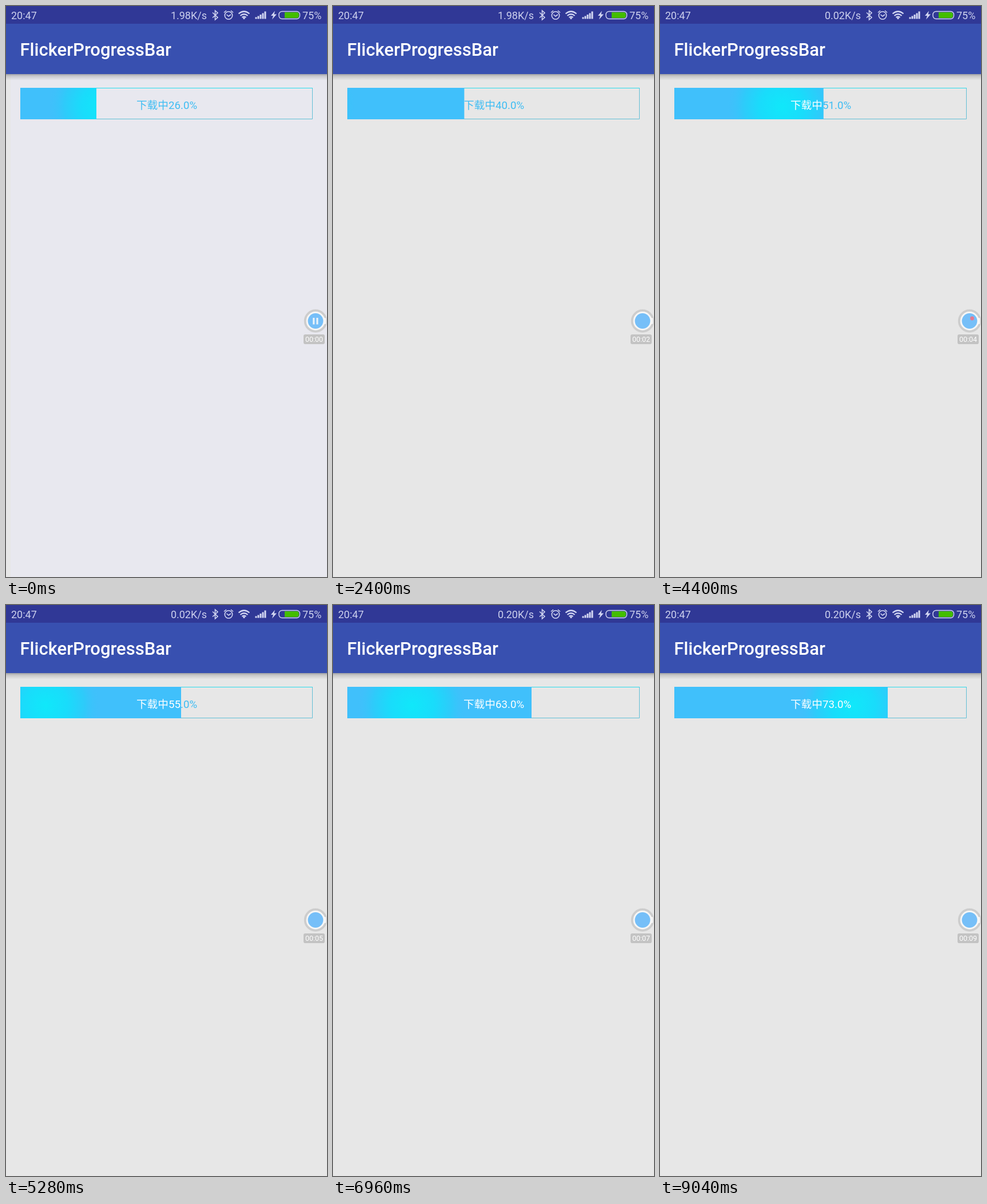
Recreate the animation shown at these times as an HTML page. Size 561 px wide and 998 px high, loop 9120 ms.

```html
<!DOCTYPE html>
<html lang="zh">
<head>
<meta charset="utf-8">
<title>FlickerProgressBar</title>
<style>
  html, body { margin: 0; width: 100%; height: 100%; overflow: hidden; background: #e7e7e7; }
  svg { display: block; width: 100%; height: 100%; }
  text { font-family: Roboto, "Noto Sans CJK SC", "Noto Sans CJK", sans-serif; }
  .status text { font-size: 18px; fill: #cdd1ee; }
  .icons { fill: none; stroke: #d3d7f2; stroke-width: 1.6; }
  .icons .solid { fill: #d3d7f2; stroke: none; }
  .label { font-size: 18.7px; text-anchor: middle; }
</style>
</head>
<body>
<svg viewBox="0 0 561 998">
  <defs>
    <linearGradient id="shadow" x2="0" y2="1">
      <stop stop-color="#000" stop-opacity=".34"/>
      <stop offset=".4" stop-color="#000" stop-opacity=".13"/>
      <stop offset="1" stop-color="#000" stop-opacity="0"/>
    </linearGradient>
    <radialGradient id="glow">
      <stop stop-color="#10e8fa"/>
      <stop offset=".4" stop-color="#19dcfb"/>
      <stop offset=".72" stop-color="#2fcafa"/>
      <stop offset="1" stop-color="#40c0fb" stop-opacity="0"/>
    </radialGradient>
    <clipPath id="done"><rect id="doneRect" x="25" y="143" height="55"/></clipPath>
  </defs>

  <rect width="561" height="998" fill="#e7e7e7"/>
  <rect id="tint" x="8" y="118" width="553" height="880" fill="#e8e8ef"/>
  <rect y="118" width="561" height="12" fill="url(#shadow)"/>
  <rect width="561" height="119" fill="#3850b0"/>
  <rect width="561" height="31" fill="#303896"/>
  <text x="24.5" y="87" font-size="31" font-weight="500" fill="#fff">FlickerProgressBar</text>

  <g class="status">
    <text x="9" y="22.5">20:47</text>
    <text id="speed" x="351" y="22.5" text-anchor="end"></text>
    <text x="518" y="22.5">75%</text>
  </g>
  <g class="icons">
    <path d="M361 11.5l9 8.5-4.500 4V8l4.500 4-9 8.500"/>
    <circle cx="389" cy="16.500" r="6.700"/>
    <path d="M385.500 15l3.500 3 4-3M381 11.500l4-3.500M397 11.500l-4-3.500"/>
    <path stroke-width="2.200" d="M406.500 13.500q9.500-8 19 0M409.500 17q6.500-5.500 13 0M412.500 20q3.500-2.600 7 0"/>
    <circle class="solid" cx="416" cy="21.500" r="1.700"/>
    <path stroke-width="3" d="M437 22.500v-3M441 22.500v-5M445 22.500v-7.500M449 22.500v-10M453 22.500v-13"/>
    <path class="solid" d="M470 8.500l-7 8.500h4l-2 6.500 8-9h-4.500z"/>
    <rect x="477" y="9.500" width="36.500" height="13" rx="5.500" stroke-width="1.400"/>
    <path fill="#43bd00" stroke="none" d="M487 11h22.500q2.500 1 2.500 5t-2.500 5H487z"/>
  </g>

  <path d="M25.500 143.500V197.500H535.500V143.500" fill="none" stroke="#62bfd6"/>
  <path d="M25 143.500H536" stroke="#2cdcec"/>
  <text class="label" x="281" y="180" fill="#3fbdf3"></text>
  <g clip-path="url(#done)">
    <rect x="25" y="143" width="511" height="55" fill="#40c0fb"/>
    <circle id="flicker" cy="176" r="96" fill="url(#glow)"/>
    <text class="label" x="281" y="180" fill="#fff"></text>
  </g>

  <circle cx="541" cy="550.500" r="18.300" fill="#f6f6f6" stroke="#cdcdcd" stroke-width="3.800"/>
  <rect x="555" y="545" width="4.500" height="11" rx="2" fill="#f6f6f6"/>
  <circle cx="541" cy="550.500" r="13.400" fill="#76bff8"/>
  <path id="pause" d="M537.800 545v11.500M544 545v11.500" stroke="#e8f2fa" stroke-width="3.200"/>
  <circle id="rec" cx="545.500" cy="546" r="3.400" fill="#e5798f"/>
  <rect x="520" y="574" width="37" height="17" rx="3" fill="#c3c3c3"/>
  <text id="timer" x="538.500" y="587.300" font-size="12.500" text-anchor="middle" fill="#fff"></text>
</svg>
<script>
  const LOOP = 9120, STEP = 80;
  const BAR_LEFT = 25, BAR_WIDTH = 511;
  // [time in ms, percent]
  const PROGRESS = [[0, 26.5], [1440, 33.5], [2960, 44.5], [4400, 51.5], [6000, 58.5], [7840, 67.5], [9120, 73.9]];
  const LAP_STARTS = [-676, 249, 1217, 2365, 3600, 4890, 6374, 7887];
  const FLICKER_START = -68, FLICKER_SPEED = 0.352;

  const byId = id => document.getElementById(id);
  const labels = document.querySelectorAll('.label');
  const show = (id, on) => byId(id).setAttribute('visibility', on ? 'visible' : 'hidden');

  function percentAt(t) {
    const i = PROGRESS.findIndex(([time]) => time > t);
    const [t0, p0] = PROGRESS[i - 1], [t1, p1] = PROGRESS[i];
    return Math.floor(p0 + (p1 - p0) * (t - t0) / (t1 - t0));
  }

  function render(t) {
    const percent = percentAt(t);
    labels.forEach(el => { el.textContent = `下载中${percent.toFixed(1)}%`; });
    byId('doneRect').setAttribute('width', BAR_WIDTH * percent / 100);

    const lapStart = LAP_STARTS.filter(s => s <= t).pop();
    byId('flicker').setAttribute('cx', FLICKER_START + FLICKER_SPEED * (t - lapStart));

    byId('speed').textContent = t < 2480 ? '1.98K/s' : t < 6480 ? '0.02K/s' : '0.20K/s';
    byId('timer').textContent = '00:0' + Math.floor((t + 235) / 1000);

    const starting = t < 400;
    const blink = t % 975;
    show('pause', starting);
    show('rec', !starting && (blink < 90 || blink >= 485));
    show('tint', t < STEP);
  }

  const origin = performance.now();
  function tick() {
    const t = (performance.now() - origin) % LOOP;
    render(Math.floor(t / STEP) * STEP);
    requestAnimationFrame(tick);
  }
  tick();
</script>
</body>
</html>
```
